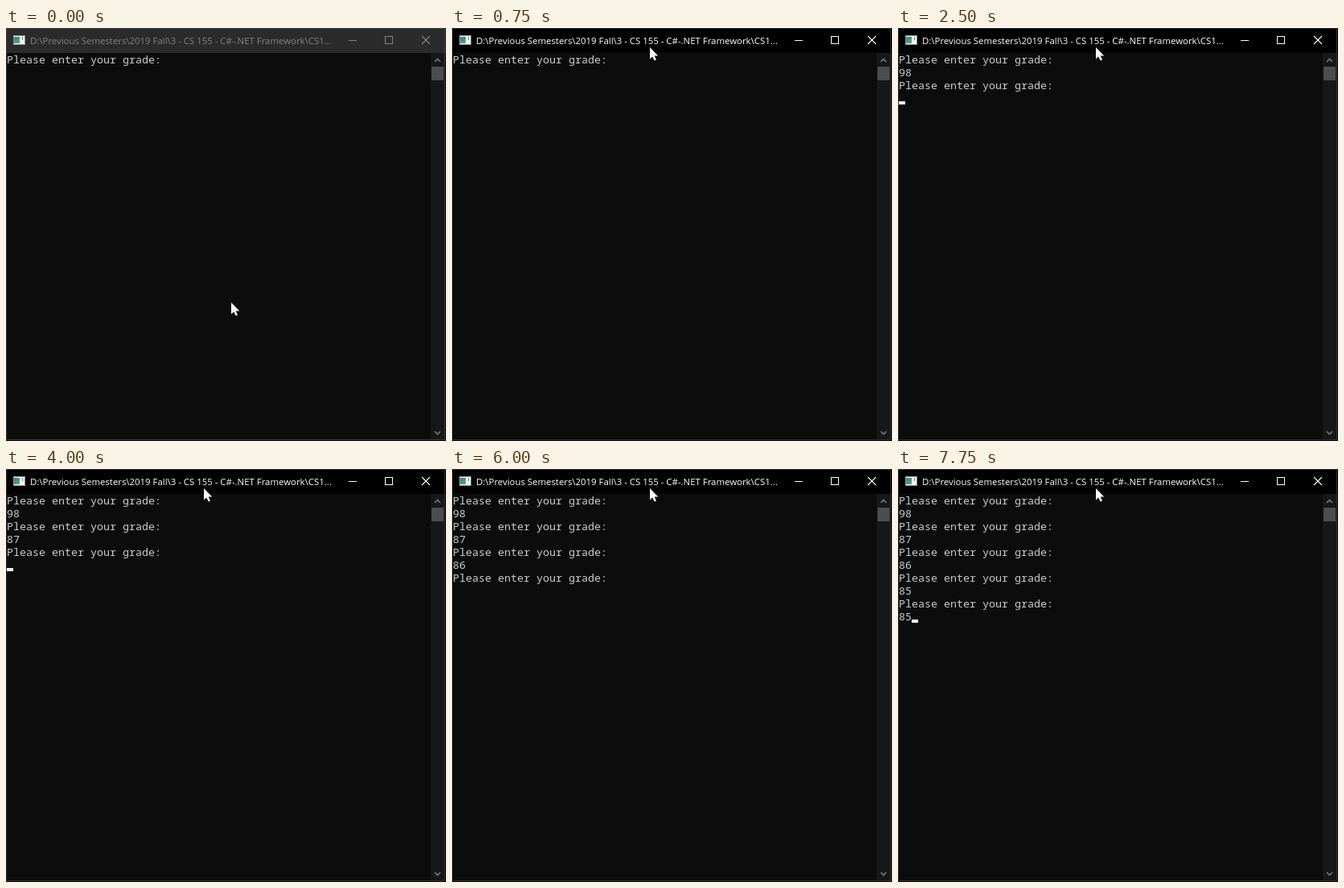
Animation of 547 by 513 pixels, one loop 8000 ms. Source, as an HTML page with a canvas:

```html
<!DOCTYPE html>
<html lang="en">
<head>
<meta charset="utf-8">
<title>Console grade entry</title>
<style>
  html, body { margin: 0; width: 100%; height: 100%; overflow: hidden; background: #0c0c0c; }
  canvas { display: block; }
</style>
</head>
<body>
<canvas id="stage" width="547" height="513"></canvas>
<script>
const ctx = document.getElementById('stage').getContext('2d');
const LOOP = 8000;
const PROMPT = 'Please enter your grade:';
const TITLE = 'D:\\Previous Semesters\\2019 Fall\\3 - CS 155 - C#-.NET Framework\\CS1...';

// Each entry: start time, finished grades, text being typed, caret visible
const consoleStates = [
  [0, [], '', false],
  [1250, [], '', true],
  [1750, [], '', false],
  [2000, [], '98', true],
  [2500, ['98'], '', true],
  [3250, ['98'], '8', true],
  [3500, ['98'], '87', false],
  [4000, ['98', '87'], '', true],
  [4500, ['98', '87'], '8', true],
  [4750, ['98', '87'], '86', true],
  [5000, ['98', '87'], '86', false],
  [5250, ['98', '87', '86'], '', true],
  [6000, ['98', '87', '86'], '', false],
  [6750, ['98', '87', '86'], '8', true],
  [7000, ['98', '87', '86'], '85', true],
  [7250, ['98', '87', '86', '85'], '', true],
  [7750, ['98', '87', '86', '85'], '85', true],
];

// Each entry: start time, x, y of the pointer tip
const pointerStates = [[0, 280, 341], [250, 196, 76], [500, 246, 24]];

const stateAt = (states, time) => states.filter(([start]) => start <= time).pop();

function rect(color, x, y, w, h) {
  ctx.fillStyle = color;
  ctx.fillRect(x, y, w, h);
}

function line(color, width, points) {
  ctx.strokeStyle = color;
  ctx.lineWidth = width;
  ctx.beginPath();
  points.forEach(([x, y]) => ctx.lineTo(x, y));
  ctx.stroke();
}

function drawIcon() {
  rect('#8d9296', 9, 9, 15, 12);
  rect('#f4f4f4', 10, 10, 13, 10);
  const fill = ctx.createLinearGradient(10, 10, 17, 20);
  fill.addColorStop(0, '#347a83');
  fill.addColorStop(1, '#58ad91');
  rect(fill, 10, 11, 7, 8);
  rect('#5b7fae', 20, 11, 1, 4);
}

function drawTitleBar(active) {
  const ink = active ? '#ffffff' : '#858585';
  rect(active ? '#000000' : '#2b2b2b', 0, 0, 547, 31);
  drawIcon();
  ctx.font = '11.4px "Open Sans", sans-serif';
  ctx.fillStyle = ink;
  ctx.fillText(TITLE, 30, 20);
  rect(ink, 426, 15, 10, 1);
  ctx.strokeStyle = ink;
  ctx.lineWidth = 1;
  ctx.strokeRect(471.5, 10.5, 9, 9);
  line(ink, 1.1, [[517, 10], [527, 20]]);
  line(ink, 1.1, [[527, 10], [517, 20]]);
}

function drawScrollBar() {
  rect('#171717', 528, 31, 17, 480);
  rect('#4d4d4d', 529, 48, 15, 17);
  line('#777777', 1.7, [[533, 42], [536.5, 38.5], [540, 42]]);
  line('#777777', 1.7, [[533, 501], [536.5, 504.5], [540, 501]]);
}

function drawConsole([, grades, typed, caret]) {
  const lines = [...grades.flatMap(grade => [PROMPT, grade]), PROMPT, typed];
  ctx.font = '13.333px "Noto Sans Mono", monospace';
  ctx.fillStyle = '#cccccc';
  lines.forEach((text, row) => ctx.fillText(text, 1, 44 + row * 16));
  if (caret) rect('#f2f2f2', 1 + typed.length * 8, 27 + lines.length * 16, 8, 4);
}

function drawPointer([, x, y]) {
  const outline = [[0, 0], [0, 14.5], [3.3, 11.5], [5.6, 16.5], [7.9, 15.5], [5.7, 10.6], [10.2, 10.4]];
  ctx.beginPath();
  outline.forEach(([dx, dy]) => ctx.lineTo(x + dx, y + dy));
  ctx.closePath();
  ctx.fillStyle = '#ffffff';
  ctx.fill();
}

function draw(now) {
  const time = now % LOOP;
  const active = time >= 750;
  rect('#0c0c0c', 0, 0, 547, 513);
  drawTitleBar(active);
  drawScrollBar();
  drawConsole(stateAt(consoleStates, time));
  ctx.strokeStyle = active ? '#303030' : '#3c3c3c';
  ctx.lineWidth = 1;
  ctx.strokeRect(0.5, 0.5, 545, 511);
  drawPointer(stateAt(pointerStates, time));
}

const begin = performance.now();
function tick() {
  draw(performance.now() - begin);
  requestAnimationFrame(tick);
}
tick();
</script>
</body>
</html>
```
